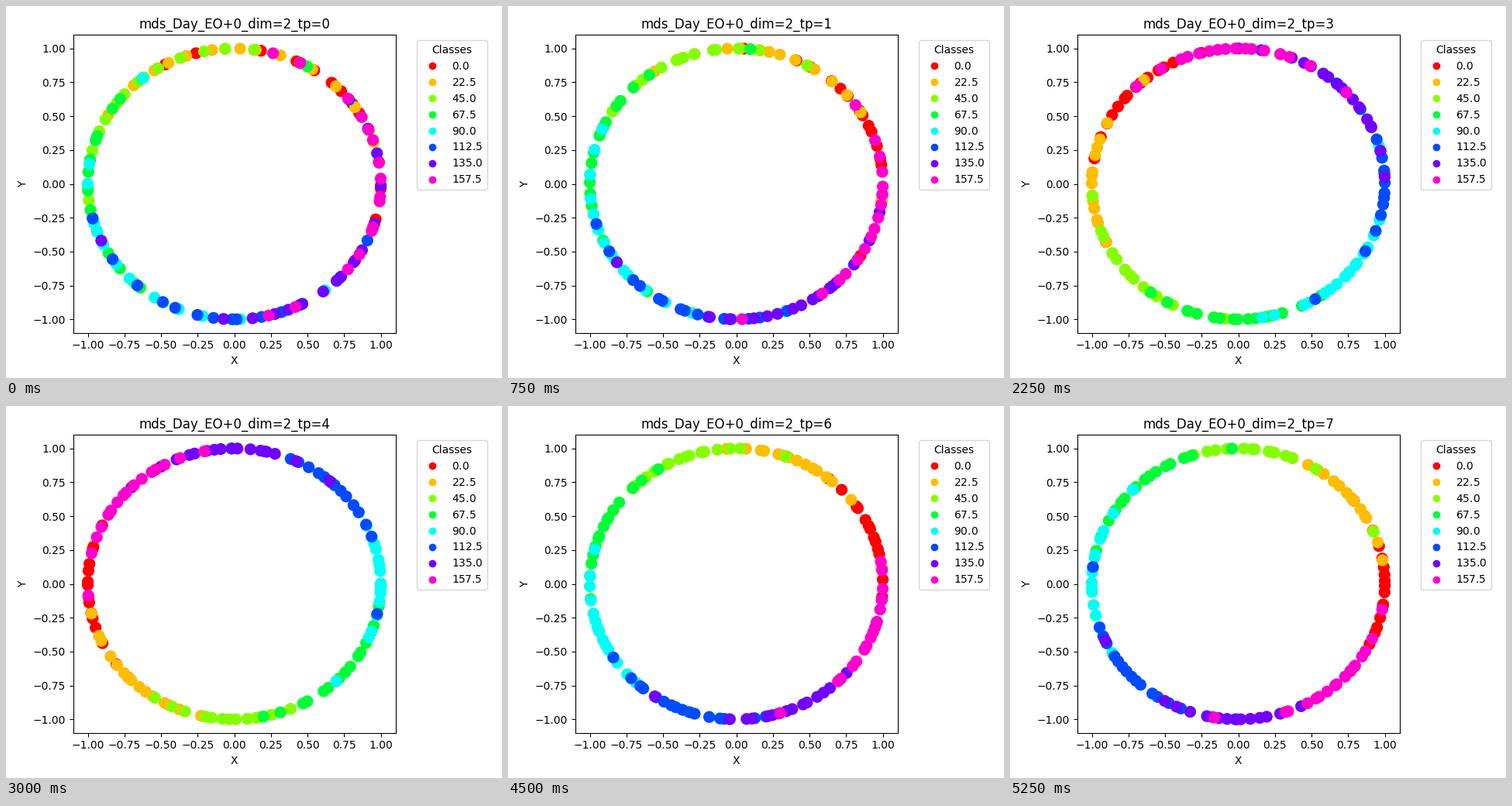
Recreate the animation shown at these times as a matplotlib script. Size 640 px wide and 480 px high, loop 6000 ms.

```python
import matplotlib.pyplot as plt
import numpy as np
from matplotlib.animation import FuncAnimation

W, H, DPI = 640, 480, 100
COUNT = 16                              # points per class
CLASSES = np.arange(8) * 22.5
# Centre of the first class and spread of every class, in degrees, per step.
STARTS = [45, 28, 12, 137, 183, 228, 22, -3]
SPREADS = [45, 32, 22, 24, 23, 23, 21, 21]


def cloud(step):
    """Points on the unit circle and their classes.

    Classes follow one another counterclockwise; within a class the angles
    are bell-shaped, with one random draw from each equal share.
    """
    rng = np.random.default_rng(step)
    share = np.arange(COUNT) + rng.uniform(0.05, 0.95, (len(CLASSES), COUNT))
    p = share / COUNT
    offset = 0.55 * SPREADS[step] * np.log(p / (1 - p))
    centre = STARTS[step] + 2 * CLASSES[:, None]
    a = np.radians(centre + offset).ravel()
    return np.column_stack([np.cos(a), np.sin(a)]), np.repeat(CLASSES, COUNT)


clouds = [cloud(step) for step in range(len(STARTS))]

fig, ax = plt.subplots(figsize=(W / DPI, H / DPI), dpi=DPI)
xy, values = clouds[0]
dots = ax.scatter(*xy.T, c=values, s=100, cmap="hsv", vmin=0, vmax=180)
ax.set(xlim=(-1.1, 1.1), ylim=(-1.1, 1.1), xlabel="X", ylabel="Y")
title = ax.set_title("mds_Day_EO+0_dim=2_tp=0")
ax.legend(*dots.legend_elements(), title="Classes",
          bbox_to_anchor=(1.05, 1), loc="upper left")
fig.tight_layout()


def draw(step):
    points, classes = clouds[step]
    dots.set_offsets(points)
    dots.set_array(classes)
    title.set_text(f"mds_Day_EO+0_dim=2_tp={step}")
    return dots, title


anim = FuncAnimation(fig, draw, frames=len(clouds), interval=750, repeat=True)
plt.show()
```
